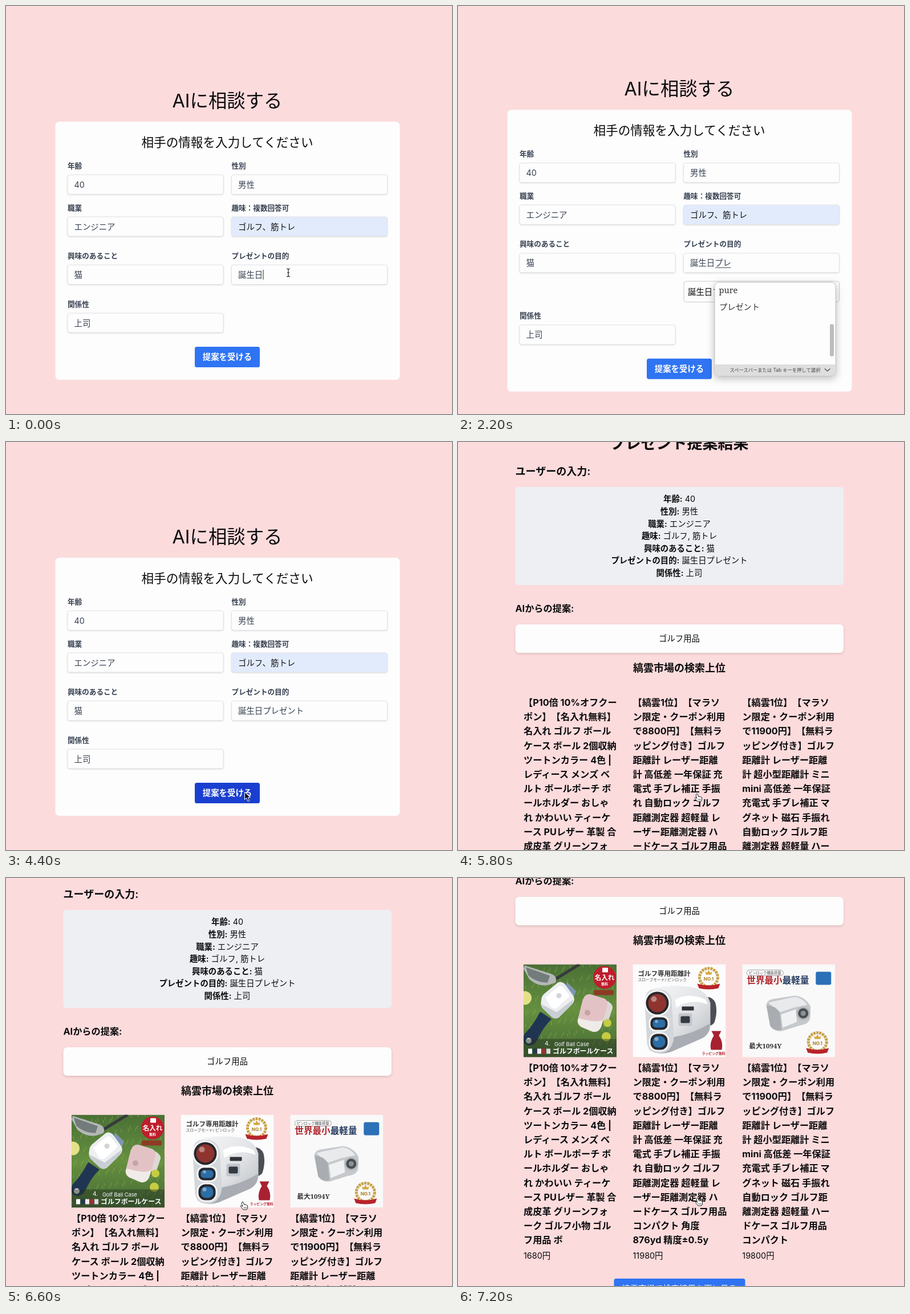
These frames come from a looping animation (782 by 716 pixels, 7300 ms). An HTML page:

```html
<!DOCTYPE html>
<html lang="ja">
<head>
<meta charset="utf-8">
<title>AIに相談する</title>
<style>
html, body { margin: 0; width: 100%; height: 100%; overflow: hidden; background: #fcdbdc; }
svg { display: block; width: 782px; height: 716px; }
text { font-family: Inter, "Noto Sans CJK JP", "Noto Sans CJK", sans-serif; text-spacing-trim: space-all; }
.serif { font-family: "Noto Serif", "Noto Sans CJK JP", serif; }
.field { fill: #fdfdfd; stroke: #dfe2e7; filter: drop-shadow(0 1px 1px rgba(0,0,0,.13)); }
.filled { fill: #e2ebfc; }
.raised { filter: drop-shadow(0 2px 2px rgba(0,0,0,.13)); }
.popup { filter: drop-shadow(0 4px 7px rgba(0,0,0,.28)); }
</style>
</head>
<body>
<svg id="stage" viewBox="0 0 782 716" xmlns="http://www.w3.org/2000/svg"></svg>
<script>
const LOOP = 7300, STEP = 100, SHIFT = 20.7, PHOTO = 163;
const INK = '#374151', BLUE = '#2f74f3', NAVY = '#1a3fd0';

// Text placed by the vertical middle of its glyph box.
const text = (x, mid, size, str, o = {}) =>
  `<text x="${x}" y="${(mid + size * .375).toFixed(2)}" font-size="${size}" font-weight="${o.w || 400}"` +
  ` fill="${o.fill || '#0b0b0d'}" text-anchor="${o.at || 'start'}"${o.id ? ` id="${o.id}"` : ''}` +
  `${o.cls ? ` class="${o.cls}"` : ''}>${str}</text>`;
const center = (mid, size, str, o = {}) => text(388, mid, size, str, { ...o, at: 'middle' });
const rect = (x, y, w, h, r, fill, more = '') =>
  `<rect x="${x}" y="${y}" width="${w}" height="${h}" rx="${r}" fill="${fill}" ${more}/>`;
const circle = (x, y, r, fill, more = '') => `<circle cx="${x}" cy="${y}" r="${r}" fill="${fill}" ${more}/>`;
const path = (d, fill, more = '') => `<path d="${d}" fill="${fill}" ${more}/>`;
const group = (id, body, more = '') => `<g id="${id}" ${more}>${body}</g>`;

function field(x, y, label, value, o = {}) {
  return text(x, y - 16.2, 12.6, label, { w: 700, fill: INK }) +
    `<rect x="${x}" y="${y}" width="273" height="34" rx="3.6" class="field ${o.filled ? 'filled' : ''}"/>` +
    text(x + 11.5, y + 17.2, 14.4, value, { fill: o.filled ? '#111' : INK, id: o.id });
}

function formPage() {
  const L = 108, R = 395.5;
  const top = center(166, 32.4, 'AIに相談する') + center(238.5, 21.6, '相手の情報を入力してください') +
    field(L, 296.2, '年齢', '40') + field(R, 296.2, '性別', '男性') +
    field(L, 370, '職業', 'エンジニア') + field(R, 370, '趣味：複数回答可', 'ゴルフ、筋トレ', { filled: true }) +
    field(L, 454.5, '興味のあること', '猫') + field(R, 454.5, 'プレゼントの目的', '', { id: 'purpose' }) +
    rect(451, 479.3, 27, 1, 0, INK, 'id="underline"') + rect(451, 463, 1, 17, 0, '#222', 'id="caret"');
  const bottom = field(L, 539, '関係性', '上司') +
    rect(331, 598, 114, 36, 3.6, BLUE, 'id="send"') + center(616, 14.4, '提案を受ける', { w: 700, fill: '#fff' });
  const hint = rect(396, 483, 272.5, 36.5, 4, '#fdfdfd', 'stroke="#c9ccd1"') +
    text(403, 501.3, 14.4, '', { id: 'hintText' });
  const ime = rect(450, 485, 212, 164, 7, '#fdfdfd', 'class="popup" stroke="#b9b9b9" stroke-width=".8"') +
    text(457.5, 498.5, 14.6, 'pure', { w: 500, fill: '#333', cls: 'serif' }) +
    text(458, 527.5, 14.2, 'プレゼント', { w: 500, fill: '#333', cls: 'serif' }) +
    rect(652, 558, 7, 57, 3.5, '#bdbdbd') +
    path('M450.4 629H661.6V642a7 7 0 0 1-7 7H457.4a7 7 0 0 1-7-7Z', '#dedede') +
    text(476.5, 638.5, 8.3, 'スペースバーまたは Tab キーを押して選択', { fill: '#444' }) +
    path('M643 636.5l4.7 4.2 4.7-4.2', 'none', 'stroke="#444" stroke-width="1.2"');
  return rect(86.5, 203, 604, 453, 7, '#fdfdfd', 'id="card"') +
    group('top', top) + group('bottom', bottom) + group('hint', hint) + group('ime', ime);
}

function award(x, y) {
  return `<g transform="translate(${x} ${y})">` +
    circle(0, -2, 16, 'none', 'stroke="#c9a24a" stroke-width="5" stroke-dasharray="4 1.2"') +
    path('M-6-13l3 3 3-5 3 5 3-3-1 6h-10Z', '#d4a63c') +
    text(0, 0, 8, 'NO.1', { w: 700, fill: '#a87a1c', at: 'middle' }) +
    path('M-20 9Q0 15 20 9L17 17Q0 21-17 17Z', '#b8232b') + '</g>';
}

function ballCase() {
  let blades = '';
  for (let i = 0; i < 160; i++) {
    const x = (i * 61.8) % 163, y = (i * 37.7) % 163;
    blades += `M${x.toFixed(1)} ${y.toFixed(1)}l${i % 5 - 2}-6`;
  }
  return rect(0, 0, 163, 163, 0, 'url(#grass)') +
    path(blades, 'none', 'stroke="#8fb45c" stroke-width="1.2" opacity=".5"') +
    path('M54 27L98 0', 'none', 'stroke="#353b39" stroke-width="5"') +
    path('M2 2L49 17Q60 22 56 32L45 36Q25 40 10 26L0 8Z', '#b3b8b7') +
    path('M4 5L46 20 42 32Q22 32 8 19Z', '#737c7a') +
    circle(2, 59, 12, '#e3e188') +
    path('M29 83L49 96Q33 112 24 133 16 146 4 141-4 134 2 122 17 107 29 83Z', '#203552') +
    circle(9, 134, 5, '#d9dcde') +
    path('M76 31L92 47 86 62 72 48Z', '#7f97b2') +
    path('M31 63Q31 56 37 51L60 32Q66 29 72 34L87 55Q91 62 86 69L62 93Q56 97 50 93L33 77Q29 71 31 63Z', '#eceef0') +
    path('M38 58L62 38Q67 37 71 42L81 56 58 77Q51 79 47 74Z', '#fff') +
    path('M31 70L58 84 87 62 86 69 62 93Q56 97 50 93L33 77Z', '#c9ced4') +
    circle(62, 55, 4.5, '#d2d4d8') +
    path('M141 62Q157 68 156 77L148 101 136 98Z', '#dcd9d5') +
    path('M104 62Q108 51 118 53L141 60Q149 64 147 74L136 110Q131 121 120 118L101 110Q92 104 96 94Z', '#f0ebe8') +
    path('M104 62Q108 51 118 53L141 60Q149 64 147 74L140 97Q128 104 96 94Z', '#e3c2c5') +
    circle(112, 85, 5, '#c7a3a6') +
    circle(147, 103, 7, '#c6cc42') + circle(145, 127, 8, '#c6cc42') +
    circle(142, 23, 20, '#bf1d2b') + rect(138, 6, 10, 8, 1, '#fff') +
    text(142, 23, 11.5, '名入れ', { w: 700, fill: '#fff', at: 'middle' }) +
    text(142, 34, 6, '無料', { w: 700, fill: '#fff', at: 'middle' }) +
    rect(123, 45, 35, 9, 3, '#8e3a24') +
    rect(0, 131, 163, 32, 0, '#243022', 'opacity=".45"') +
    ['#fff', '#263850', '#eee', '#933', '#ddd'].map((c, i) => rect(8 + i * 8, 148, 7, 9, 0, c)).join('') +
    text(37, 139, 10, '4.', { fill: '#fff' }) + text(54, 140, 9.2, 'Golf Ball Case', { fill: '#fff' }) +
    text(51, 152, 11.9, 'ゴルフボールケース', { w: 700, fill: '#fff' });
}

function rangefinder() {
  const lens = (x, y, w, h, r, c) => rect(x - w - 3, y - h - 3, w * 2 + 6, h * 2 + 6, r + 3, '#f4f5f6') +
    rect(x - w, y - h, w * 2, h * 2, r, '#25272c') + rect(x - w + 4, y - h + 4, w * 2 - 8, h * 2 - 8, r - 3, c) +
    circle(x - w * .3, y - h * .35, h * .25, '#fff', 'opacity=".4"');
  return rect(0, 0, 163, 163, 0, '#fcfcfc') +
    text(9, 16, 11.5, 'ゴルフ専用距離計', { w: 700, fill: '#333' }) +
    text(9, 27, 6.8, 'スロープモード/ ピンロック', { fill: '#555' }) + award(133, 25) +
    path('M122 58Q139 54 145 68 149 84 143 102 138 110 124 108Z', '#4b4e54') +
    path('M33 42Q75 34 108 41 130 47 136 68L136 108Q135 123 121 130L66 154Q42 161 28 150L22 70Q22 48 33 42Z', 'url(#steel)') +
    path('M74 62Q98 48 128 62L131 70Q100 59 76 76Z', '#fff') +
    path('M70 128Q105 122 135 104 136 122 121 130L66 154Q54 157 46 156Z', '#a9adb3') +
    path('M30 46Q62 38 68 62L72 128Q70 152 50 156 27 157 25 138L21 68Q21 51 30 46Z', '#d3d6da') +
    lens(43, 68, 20, 20, 20, '#8f342f') +
    lens(46, 104, 15, 11, 9, '#2b6da5') + lens(46, 136, 15, 14, 12, '#2b6da5') +
    rect(86, 74, 21, 7, 1, '#303338') + rect(80, 86, 24, 22, 3, '#c2c5ca') + rect(84, 91, 16, 12, 2, '#333a42') +
    path('M138 117h17l-4 8q8 12 5 25h-19q-3-12 5-25Z', '#a82130') +
    text(121, 156, 5.9, 'ラッピング無料', { w: 700, fill: '#b52934' });
}

function miniFinder() {
  return rect(0, 0, 163, 163, 0, '#f9f9f9') +
    rect(8, 10, 64, 10, 5, '#fff', 'stroke="#777" stroke-width=".7"') +
    text(40, 15, 6.3, 'ピンロック機能搭載', { fill: '#444', at: 'middle' }) +
    text(8, 28, 15.6, '<tspan fill="#ae262c">世界最小</tspan>最軽量', { w: 700, fill: '#24395f' }) +
    rect(129, 13, 27, 23, 3, '#2c70b8') +
    path('M42 72Q43 63 53 61L92 55Q111 57 120 74L119 95Q117 105 102 107L70 117Q56 119 49 108Z', '#c6c9cc') +
    path('M46 67L92 57Q107 60 114 71L90 76 64 85Z', '#e9eaec') +
    path('M43 72Q56 71 66 84L69 115Q56 118 49 108Z', '#a9adb1') +
    path('M68 88L94 79 96 101 71 111Z', '#f0f1f2') +
    circle(107, 86, 12, '#b4b7bb') + circle(107, 86, 9, '#4a4e53') +
    circle(107, 86, 4.5, '#8b9298') + text(12, 143, 11.6, '最大1094Y', { w: 600, fill: '#333', cls: 'serif' }) +
    award(132, 138);
}

const coupon = ['【縞雲1位】【マラソ', 'ン限定・クーポン利用'];
const finder = ['ッピング付き】ゴルフ', '距離計 レーザー距離'];
const items = [
  { x: 115, photo: ballCase, price: '1680円', lines: ['【P10倍 10%オフクー', 'ポン】【名入れ無料】',
    '名入れ ゴルフ ボール', 'ケース ボール 2個収納', 'ツートンカラー 4色 |', 'レディース メンズ ベ',
    'ルト ボールポーチ ボ', 'ールホルダー おしゃ', 'れ かわいい ティーケ', 'ース PUレザー 革製 合',
    '成皮革 グリーンフォ', 'ーク ゴルフ小物 ゴル', 'フ用品 ボ'] },
  { x: 306.5, photo: rangefinder, price: '11980円', lines: [...coupon, 'で8800円】【無料ラ', ...finder,
    '計 高低差 一年保証 充', '電式 手ブレ補正 手振', 'れ 自動ロック ゴルフ', '距離測定器 超軽量 レ',
    'ーザー距離測定器 ハ', 'ードケース ゴルフ用品', 'コンパクト 角度', '876yd 精度±0.5y'] },
  { x: 498.3, photo: miniFinder, price: '19800円', lines: [...coupon, 'で11900円】【無料ラ', ...finder,
    '計 超小型距離計 ミニ', 'mini 高低差 一年保証', '充電式 手ブレ補正 マ', 'グネット 磁石 手振れ',
    '自動ロック ゴルフ距', '離測定器 超軽量 ハー', 'ドケース ゴルフ用品', 'コンパクト'] }
];

function resultPage() {
  const bold = { w: 700 };
  const answers = [['年齢', '40'], ['性別', '男性'], ['職業', 'エンジニア'], ['趣味', 'ゴルフ, 筋トレ'],
    ['興味のあること', '猫'], ['プレゼントの目的', '誕生日プレゼント'], ['関係性', '上司']];
  const head = center(2, 27, 'プレゼント提案結果', bold) + text(100.5, 51, 18, 'ユーザーの入力:', bold) +
    rect(100.5, 79, 575.5, 172, 5, '#eeeff3') +
    answers.map(([k, v], i) =>
      center(100 + i * 21.55, 14.4, `<tspan font-weight="700">${k}:</tspan> ${v}`)).join('') +
    text(100.5, 292, 16.2, 'AIからの提案:', bold) +
    rect(100.5, 320, 575.5, 50, 7, '#fdfdfd', 'class="raised"') + center(345, 14.4, 'ゴルフ用品') +
    center(396.7, 18, '縞雲市場の検索上位', bold);
  const photos = items.map(p =>
    `<g transform="translate(${p.x} 438.5)" clip-path="url(#frame)">${p.photo()}</g>`).join('');
  const words = items.map(p =>
    p.lines.map((s, i) => text(p.x, 457 + i * 25.2, 16.2, s, bold)).join('') +
    text(p.x, 787, 14.4, p.price)).join('') +
    rect(273.5, 827, 230, 36, 3.6, BLUE) +
    center(844.5, 14.4, '縞雲市場で検索結果を更に見る', { fill: '#fff' });
  return head + group('photos', photos) + group('words', words);
}

// Pointer shapes, each centred on its own middle.
const pointers =
  group('beam', path('M-3-7Q0-7 0-5 0-7 3-7M0-5V5M-2 0H2M-3 7Q0 7 0 5 0 7 3 7', 'none',
    'stroke="#222" stroke-width="1.2"')) +
  group('arrow', path('M-4-8V5L-1 2 1.7 8 4.2 7 1.7 1.2H6Z', '#111', 'stroke="#fff" stroke-width="1"')) +
  group('hand', path('M-3-6Q-2-8-.8-6L.7-1.5Q2-3 3-1.4 4.5-2.3 5-.8 6.5-1 6.7 1L6.5 4 5 7H-1L-5.5 1.7Q-6.4-.2-4.7-.3L-2.2 1.5-3.8-4Z',
    '#fff', 'stroke="#222" stroke-width="1"') + path('M0 2.5V5M2 2.2V5M4 2V5', 'none', 'stroke="#444" stroke-width=".8"'));

document.getElementById('stage').innerHTML =
  `<defs><linearGradient id="grass" x2="0" y2="1"><stop stop-color="#4a7035"/><stop offset=".5" stop-color="#66903f"/>
  <stop offset="1" stop-color="#456a34"/></linearGradient>
  <linearGradient id="steel" x2="1" y2="1"><stop stop-color="#f7f8f9"/><stop offset=".55" stop-color="#e0e2e5"/>
  <stop offset="1" stop-color="#b3b7bc"/></linearGradient>
  <clipPath id="frame"><rect width="163" height="163"/></clipPath></defs>` +
  rect(0, 0, 782, 716, 0, '#fcdbdc') + group('form', formPage()) + group('result', resultPage()) + pointers;

const $ = id => document.getElementById(id);
const show = (id, on) => $(id).setAttribute('display', on ? 'inline' : 'none');
const move = (id, x, y) => $(id).setAttribute('transform', `translate(${x} ${y})`);
const attr = (id, o) => { for (const k in o) $(id).setAttribute(k, o[k]); };

// Rows of [time, ...values], interpolated linearly.
function track(rows, t) {
  let i = 0;
  while (i < rows.length - 2 && t >= rows[i + 1][0]) i++;
  const [a, b] = [rows[i], rows[i + 1]];
  const k = Math.min(1, Math.max(0, (t - a[0]) / (b[0] - a[0])));
  return a.slice(1).map((v, j) => v + (b[j + 1] - v) * k);
}
const typed = [[0, ''], [700, 'p'], [900, 'ぷ'], [1100, 'ぷr'], [1300, 'ぷれ'], [1500, 'プレ'], [3300, 'プレゼント']];
const mouse = [[0, 495, 468], [3400, 495, 468], [3600, 431, 498], [3900, 426, 545], [4200, 422.5, 622.5],
  [5600, 422.5, 622.5], [5700, 421, 624], [6400, 421, 624], [6600, 417, 575], [7200, 422, 568]];
const scroll = [[6400, 0], [6500, 8], [6600, 23], [6700, 68], [6800, 128], [6900, 188], [7000, 238], [7100, 272], [7200, 287]];

function draw(t) {
  const onForm = t < 5700, open = t >= 900 && t < 3500;
  show('form', onForm);
  show('result', !onForm);

  const d = open ? SHIFT : 0;
  move('top', 0, -d);
  move('bottom', 0, d);
  attr('card', { y: 203 - d, height: 453 + d * 2 });
  const add = typed.filter(r => t >= r[0]).pop()[1];
  const composing = t >= 700 && t < 3500;
  $('purpose').textContent = '誕生日' + add;
  $('hintText').textContent = '誕生日' + add;
  const width = [...add].reduce((w, c) => w + (c < '~' ? 8 : 14.4), 0);
  show('underline', composing);
  attr('underline', { width: Math.max(0, width - 1.5) });
  attr('caret', { x: 450.5 + width });
  show('caret', t < 4300 && !(t >= 1500 && t < 3500));
  show('hint', open);
  show('ime', open && t >= 1500);
  attr('send', { fill: t >= 4200 ? NAVY : BLUE });

  const loaded = t >= 6000;
  move('result', 0, -track(scroll, t)[0]);
  show('photos', loaded);
  move('words', 0, loaded ? PHOTO : 0);

  const [x, y] = track(mouse, t);
  const kind = t < 3800 ? 'beam' : onForm ? 'arrow' : 'hand';
  for (const id of ['beam', 'arrow', 'hand']) {
    show(id, id === kind && !composing);
    move(id, x, y);
  }
}

function tick() {
  draw(Math.floor(performance.now() % LOOP / STEP) * STEP);
  requestAnimationFrame(tick);
}
tick();
</script>
</body>
</html>
```
